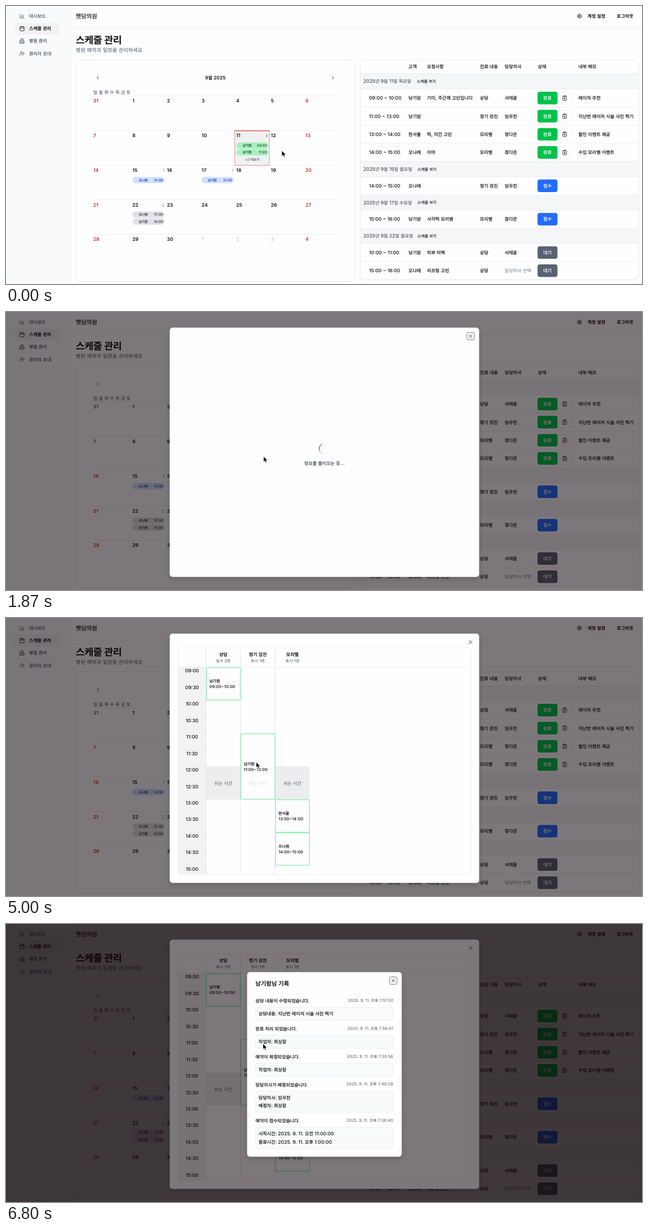
Recreate the animation shown at these times as an HTML page. Size 1130 by 496 pixels, loop 6870 ms.

```html
<!DOCTYPE html>
<html lang="ko">
<head>
<meta charset="utf-8">
<style>
html, body { margin: 0; width: 100%; height: 100%; overflow: hidden; background: #fefdff; }
svg { display: block; width: 1130px; height: 496px; }
text { font-family: Inter, "Noto Sans CJK KR", "Noto Sans CJK", sans-serif; text-rendering: geometricPrecision; }
tspan { font-size: .94em; }
.medium tspan { stroke: currentColor; stroke-width: .2px; }
.dialog { filter: drop-shadow(0 4px 4px rgba(0, 0, 0, .16)); }
</style>
</head>
<body>
<svg id="stage" viewBox="0 0 1130 496"></svg>
<script>
const LOOP = 6870, STEP = LOOP / 103;
const WHITE = '#fefdff', INK = '#111114', GRAY = '#4b5563', SOFT = '#6b7280', LINE = '#e9e9ec', RED = '#dc2626';
const PATIENT = '남기람', SECOND = '한서율', THIRD = '오나래';
const DOCTORS = ['서태윤', '임우찬', '정다온'], MANAGER = '최실장';
const INJECTION = '모리벨';
const LOADING = '정보를 불러오는 중...';

// y is the vertical middle of the line
function text(x, y, str, { size = 8.58, weight = 500, fill = INK, anchor = 'start', extra = '' } = {}) {
  const body = str.replace(/[가-힣]+/g, run => `<tspan>${run}</tspan>`);
  const medium = weight === 500 ? `class="medium" color="${fill}"` : '';
  return `<text x="${x}" y="${y + size * .36}" font-size="${size}" font-weight="${weight}" fill="${fill}" text-anchor="${anchor}" ${medium} ${extra}>${body}</text>`;
}
const rect = (x1, y1, x2, y2, fill, r = 0, stroke = 'none', sw = .7, extra = '') =>
  `<rect x="${x1}" y="${y1}" width="${x2 - x1}" height="${y2 - y1}" rx="${r}" fill="${fill}" stroke="${stroke}" stroke-width="${sw}" ${extra}/>`;
const line = (x1, y1, x2, y2, color = LINE, sw = .7) =>
  `<path d="M${x1} ${y1}L${x2} ${y2}" stroke="${color}" stroke-width="${sw}"/>`;
const icon = (d, x, y, color = INK, size = 9.8) =>
  `<path transform="translate(${x - size / 2} ${y - size / 2}) scale(${size / 24})" d="${d}" fill="none" stroke="${color}" stroke-width="2" stroke-linecap="round" stroke-linejoin="round"/>`;
const group = (id, body) => `<g id="${id}">${body}</g>`;
const dim = () => rect(0, 0, 1130, 496, 'rgba(10,0,4,.53)');

const circle = (x, y, r) => `M${x - r} ${y}a${r} ${r} 0 1 0 ${2 * r} 0a${r} ${r} 0 1 0 ${-2 * r} 0`;
const box = (x, y, w, h) => `M${x + 2} ${y}h${w - 4}a2 2 0 0 1 2 2v${h - 4}a2 2 0 0 1-2 2h${4 - w}a2 2 0 0 1-2-2v${4 - h}a2 2 0 0 1 2-2`;
function gear() {
  let d = circle(12, 12, 3) + circle(12, 12, 8);
  for (let i = 0; i < 8; i++) {
    const c = Math.cos(i * Math.PI / 4), s = Math.sin(i * Math.PI / 4);
    d += `M${12 + 8 * c} ${12 + 8 * s}L${12 + 10 * c} ${12 + 10 * s}`;
  }
  return d;
}
const ICONS = {
  chart: 'M3 3v16a2 2 0 0 0 2 2h16M18 17V9M13 17V5M8 17v-3',
  calendar: box(3, 4, 18, 18) + 'M8 2v4M16 2v4M3 10h18',
  hospital: 'M12 6v4M14 8h-4M14 14h-4M14 18h-4M18 12h2a2 2 0 0 1 2 2v6a2 2 0 0 1-2 2H4a2 2 0 0 1-2-2v-9a2 2 0 0 1 2-2h2M18 22V4a2 2 0 0 0-2-2H8a2 2 0 0 0-2 2v18',
  invite: circle(9, 7, 4) + 'M16 21v-2a4 4 0 0 0-4-4H6a4 4 0 0 0-4 4v2M19 8v6M22 11h-6',
  clipboard: 'M9 2h6v4H9zM16 4h2a2 2 0 0 1 2 2v14a2 2 0 0 1-2 2H6a2 2 0 0 1-2-2V6a2 2 0 0 1 2-2h2M9 14h6M12 11v6',
  left: 'M15 18l-6-6 6-6',
  right: 'M9 18l6-6-6-6',
  close: 'M18 6L6 18M6 6l12 12'
};

function frame() {
  const menu = [['chart', '대시보드'], ['calendar', '스케줄 관리'], ['hospital', '병원 관리'], ['invite', '관리자 초대']];
  return rect(0, 0, 1130, 496, WHITE) + rect(0, 0, 113.5, 496, '#f9fafb') + line(113.7, 0, 113.7, 496) +
    line(114, 39.3, 1130, 39.3) + rect(16, 30, 95, 51, '#f2f2f4', 4) +
    menu.map(([name, label], i) => {
      const y = 18 + i * 22.2, on = i === 1;
      return icon(ICONS[name], 28.5, y, on ? INK : GRAY) +
        text(41, y, label, { weight: on ? 600 : 500, fill: on ? INK : GRAY });
    }).join('') +
    text(124, 18, '햇담의원', { size: 11, weight: 500 }) +
    icon(gear(), 1019, 18) + text(1033, 18, '계정 설정', { weight: 600 }) + text(1085, 18, '로그아웃', { weight: 600 }) +
    text(124, 60, '스케줄 관리', { size: 18.4, weight: 700, extra: 'letter-spacing="-.4"' }) +
    text(124, 78.5, '병원 예약과 일정을 관리하세요', { size: 9.8, weight: 400, fill: GRAY });
}

const card = (x1, y1, x2, y2) =>
  rect(x1, y1 + 1, x2, y2 + .8, '#e9e9ec', 8) + rect(x1, y1, x2, y2, WHITE, 8, '#e2e2e6');

function pill(x, y, name, time, fill, ink) {
  const style = { size: 6.1, fill: ink };
  return rect(x, y, x + 57.2, y + 11.2, fill, 5.6) + text(x + 11.5, y + 5.7, name, style) +
    text(x + 54.5, y + 5.7, time, { ...style, anchor: 'end' });
}

function calendar() {
  const colX = i => i ? 163 + 61.5 * i : 155;
  const rowY = r => 160.3 + 61.8 * r;
  const count = (x, y, n) => text(x, y, n, { size: 7.4, weight: 400, fill: '#80838a', anchor: 'end' });
  let s = card(124, 96, 619.5, 491.5) + icon(ICONS.left, 163, 128) + icon(ICONS.right, 581, 128) +
    text(372, 128, '9월 2025', { anchor: 'middle', weight: 600 }) +
    text(155, 153.5, '일 월 화 수 목 금 토', { weight: 400, fill: '#3f4147' });
  for (let r = 0; r < 5; r++) s += line(155, rowY(r), 591, rowY(r));
  s += rect(406.3, 222.3, 468, 284.2, '#f1f1f2', 0, '#dc7b7b', .8) + line(406, 222.6, 468.4, 222.6, '#ef4444', 1.4);
  for (let i = 0; i < 35; i++) {
    const col = i % 7, day = i ? (i - 1) % 30 + 1 : 31;
    const fill = col % 6 === 0 ? RED : i > 30 ? '#b9bbc0' : INK;
    s += text(colX(col), rowY(i / 7 | 0) + 8.9, String(day), { fill, weight: i > 30 && col < 6 ? 400 : 600 });
  }
  const green = ['#aaf0bf', '#14532d'], blue = ['#d0e1fc', '#1e40af'], gray = ['#dfe1e5', '#33363d'];
  return s + count(465.5, 231, '4') + count(281.5, 293, '1') + count(404, 293, '1') + count(281.5, 355, '2') +
    pill(409, 243.3, PATIENT, '09:00', ...green) + pill(409, 255.6, PATIENT, '11:00', ...green) +
    text(437.3, 274, '+2 더보기', { size: 6.2, fill: GRAY, anchor: 'middle' }) +
    pill(224.5, 305, THIRD, '14:00', ...blue) + pill(347.3, 305, PATIENT, '15:00', ...blue) +
    pill(224.5, 366.6, THIRD, '15:00', ...gray) + pill(224.5, 379, PATIENT, '10:00', ...gray);
}

function table() {
  const [docA, docB, docC] = DOCTORS;
  const cols = [645, 715, 748, 842, 886];
  const colors = { 완료: '#00c14b', 접수: '#226cfb', 대기: '#596273' };
  const heads = [[715, '고객'], [748, '요청사항'], [842, '진료 내용'], [886, '담당의사'], [945, '상태'], [1017, '내부 메모']];
  const rows = [
    ['2025년 9월 11일 목요일'],
    ['09:00 ~ 10:00', PATIENT, '기미, 주근깨 고민입니다', '상담', docA, '완료', '레이저 추천'],
    ['11:00 ~ 13:00', PATIENT, '', '정기 검진', docB, '완료', '지난번 레이저 시술 사진 찍기'],
    ['13:00 ~ 14:00', SECOND, '턱, 미간 고민', INJECTION, docC, '완료', '할인 이벤트 제공'],
    ['14:00 ~ 15:00', THIRD, '이마', INJECTION, docC, '완료', '수입 ' + INJECTION + ' 이벤트'],
    ['2025년 9월 15일 월요일'],
    ['14:00 ~ 15:00', THIRD, '', '정기 검진', docB, '접수'],
    ['2025년 9월 17일 수요일'],
    ['15:00 ~ 16:00', PATIENT, '사각턱 ' + INJECTION, INJECTION, docC, '접수'],
    ['2025년 9월 22일 월요일'],
    ['10:00 ~ 11:00', PATIENT, '피부 미백', '상담', docA, '대기'],
    ['15:00 ~ 16:00', THIRD, '리프팅 고민', '상담', '담당의사 선택', '대기']
  ];
  let s = card(629.3, 96, 1124.7, 488.5) + heads.map(([x, label]) => text(x, 108.3, label)).join('');
  let y = 120.8;
  rows.forEach((row, n) => {
    const title = row.length === 1, h = title ? 27.2 : 32.35, mid = y + h / 2;
    if (title) {
      s += rect(629.7, y, 1124.3, y + h, '#f5f6f8') + text(635, mid, row[0], { weight: 400, fill: '#2d3038' }) +
        text(n ? 731 : 730, mid, '스케줄 보기', { size: 7.4, fill: '#2d3038' });
    } else {
      const [status, memo] = row.slice(5);
      cols.forEach((x, i) => {
        const unset = row[i].endsWith('선택');
        s += text(x, mid, row[i], { fill: unset ? SOFT : INK, weight: unset ? 400 : 500 });
      });
      s += rect(944.4, mid - 11.2, 979.8, mid + 11.2, colors[status], 4) +
        text(962, mid, status, { fill: '#fff', anchor: 'middle' });
      if (memo) s += rect(980.8, mid - 11, 1004.6, mid + 11, WHITE, 4, '#ededf0') +
        icon(ICONS.clipboard, 992.6, mid) + text(1017, mid, memo);
    }
    s += line(629.7, y, 1124.3, y);
    y += h;
  });
  return s;
}

const dialog = (x1, y1, x2, y2) => rect(x1, y1, x2, y2, WHITE, 5, '#e3e3e6', .5, 'class="dialog"');
const ring = (x, y) => rect(x - 6.6, y - 6.6, x + 6.6, y + 6.6, 'none', 2, '#7d7e84', 1);
const closeIcon = (x, y) => icon(ICONS.close, x, y, '#3a3b40', 11);
const title = y => text(443.3, y, PATIENT + '님 기록', { size: 11, weight: 600 });
const spinner = (id, r) =>
  `<path id="${id}" fill="#2563eb" d="M${-r} 0A${r} ${r} 0 0 0 ${r} 0A${r} ${r - 1.3} 0 0 1 ${-r} 0"/>`;

function schedule() {
  const colX = [355.5, 416.7, 478.2, 539.6];
  const slotY = hour => 88.2 + (hour - 9) * 58.92;
  const clock = h => `${String(Math.floor(h)).padStart(2, '0')}:${h % 1 ? '30' : '00'}`;
  const mid = c => (colX[c] + colX[c + 1]) / 2;
  const rest = (c, fill) => text(mid(c), 294.5, '쉬는 시간', { weight: 400, fill, anchor: 'middle' });
  let s = rect(306, 88, 355.5, 458, '#f3f3f5');
  for (let h = 9; h <= 15; h += .5)
    s += line(306, slotY(h), 355.5, slotY(h)) + text(330.6, slotY(h) + 6, clock(h), { anchor: 'middle' });
  s += rect(355.5, slotY(12), 539.6, slotY(13), '#ecedef') + rest(0, GRAY) + rest(2, GRAY);
  s += rect(306, 53, 826, 458, 'none', 0, LINE) + line(306, 87.8, 826, 87.8);
  for (let c = 0; c < 3; c++) s += line(colX[c], 53, colX[c], 458, '#dddee2');
  [['상담', '3'], ['정기 검진', '1'], [INJECTION, '1']].forEach(([name, n], c) => {
    s += text(mid(c), 65.3, name, { weight: 600, anchor: 'middle' }) +
      text(mid(c), 76.5, `동시 ${n}명`, { size: 7.4, weight: 400, fill: GRAY, anchor: 'middle' });
  });
  [[0, 9, 10, PATIENT], [1, 11, 13, PATIENT], [2, 13, 14, SECOND], [2, 14, 15, THIRD]].forEach(([c, from, to, name]) => {
    const y1 = slotY(from), y2 = slotY(to), y = (y1 + y2) / 2;
    s += rect(colX[c] + .6, y1 + .5, colX[c + 1] - .3, y2 - .6, WHITE, 1.2, '#86efac', 1.3) +
      text(colX[c] + 5.7, y - 5, name, { size: 7.4 }) +
      text(colX[c] + 5.7, y + 5, `${clock(from)}~${clock(to)}`, { size: 7.4 });
  });
  return s + rest(1, '#d9dadd');
}

function records() {
  const entries = [
    [137, '상담 내용이 수정되었습니다.', '7:57:01', ['상담내용: 지난번 레이저 시술 사진 찍기']],
    [187, '완료 처리 되었습니다.', '7:56:01', ['작업자: ' + MANAGER]],
    [236.8, '예약이 확정되었습니다.', '7:55:56', ['작업자: ' + MANAGER]],
    [286.5, '담당의사가 배정되었습니다.', '7:40:28', ['담당의사: ' + DOCTORS[1], '배정자: ' + MANAGER]],
    [351, '예약이 접수되었습니다.', '7:36:40', ['시작시간: 2025. 9. 11. 오전 11:00:00', '종료시간: 2025. 9. 11. 오후 1:00:00']]
  ];
  return dialog(428.5, 86, 703, 415) + title(105.8) + ring(688, 101) + closeIcon(688, 101) +
    entries.map(([y, label, time, lines]) =>
      text(443.3, y, label) +
      text(688, y - .7, '2025. 9. 11. 오후 ' + time, { size: 7.4, fill: SOFT, anchor: 'end' }) +
      rect(443.3, y + 11.5, 688, y + 34.7 + (lines.length - 1) * 14.8, '#f8fafc', 4, '#e9ebef') +
      lines.map((l, i) => text(448.8, y + 23 + i * 14.7, l)).join('')
    ).join('');
}

const stage = document.getElementById('stage');
stage.innerHTML = frame() + calendar() + table() +
  group('day', dim() + dialog(291, 28, 840.5, 472.5) + closeIcon(825.4, 43) +
    group('dayRing', ring(825.4, 43)) +
    group('dayLoading', spinner('spinA', 9.8) + text(565.7, 270, LOADING, { fill: GRAY, anchor: 'middle' })) +
    group('plan', schedule())) +
  group('history', dim() +
    group('historyLoading', dialog(428.5, 193.3, 703, 307.5) + title(213.3) + ring(688, 208.2) + closeIcon(688, 208.2) +
      spinner('spinB', 7.4) + text(539.6, 265.7, LOADING, { fill: SOFT })) +
    group('log', records())) +
  '<path id="cursor" d="M0 0V10.3L2.4 8.1L4 11.7L5.8 10.9L4.3 7.4H7.4Z" fill="#000" stroke="#fff" stroke-width=".8" stroke-linejoin="round"/>';

// [from, to) in ms
const VISIBLE = {
  day: [640, LOOP], dayRing: [640, 4950], dayLoading: [640, 3440], plan: [3440, LOOP],
  history: [5040, LOOP], historyLoading: [5040, 6450], log: [6450, LOOP]
};
const PATH = [[0, 490, 258], [60, 490, 258], [500, 451, 260.5], [670, 451, 260.5], [1870, 457.5, 257.5], [3070, 476.5, 239],
  [4800, 444.5, 257], [6670, 444.5, 257], [6800, 456.5, 213.5], [LOOP, 456.5, 213.5]];
const el = id => document.getElementById(id);

function cursorAt(t) {
  const i = PATH.findIndex(p => p[0] > t), [t0, x0, y0] = PATH[i - 1], [t1, x1, y1] = PATH[i];
  const k = (t - t0) / (t1 - t0);
  return `translate(${x0 + (x1 - x0) * k} ${y0 + (y1 - y0) * k})`;
}

function draw(t) {
  for (const id in VISIBLE) {
    const [from, to] = VISIBLE[id];
    el(id).style.display = t >= from && t < to ? '' : 'none';
  }
  el('spinA').setAttribute('transform', `translate(565.6 244) rotate(${(t - 592) * .36})`);
  el('spinB').setAttribute('transform', `translate(527.6 265.6) rotate(${(t - 4975) * .36})`);
  el('cursor').setAttribute('transform', cursorAt(t));
}

const start = performance.now();
function tick() {
  const t = (performance.now() - start) % LOOP;
  draw(Math.min(102, Math.floor((t + 4) / STEP)) * STEP);
  requestAnimationFrame(tick);
}
tick();
</script>
</body>
</html>
```
